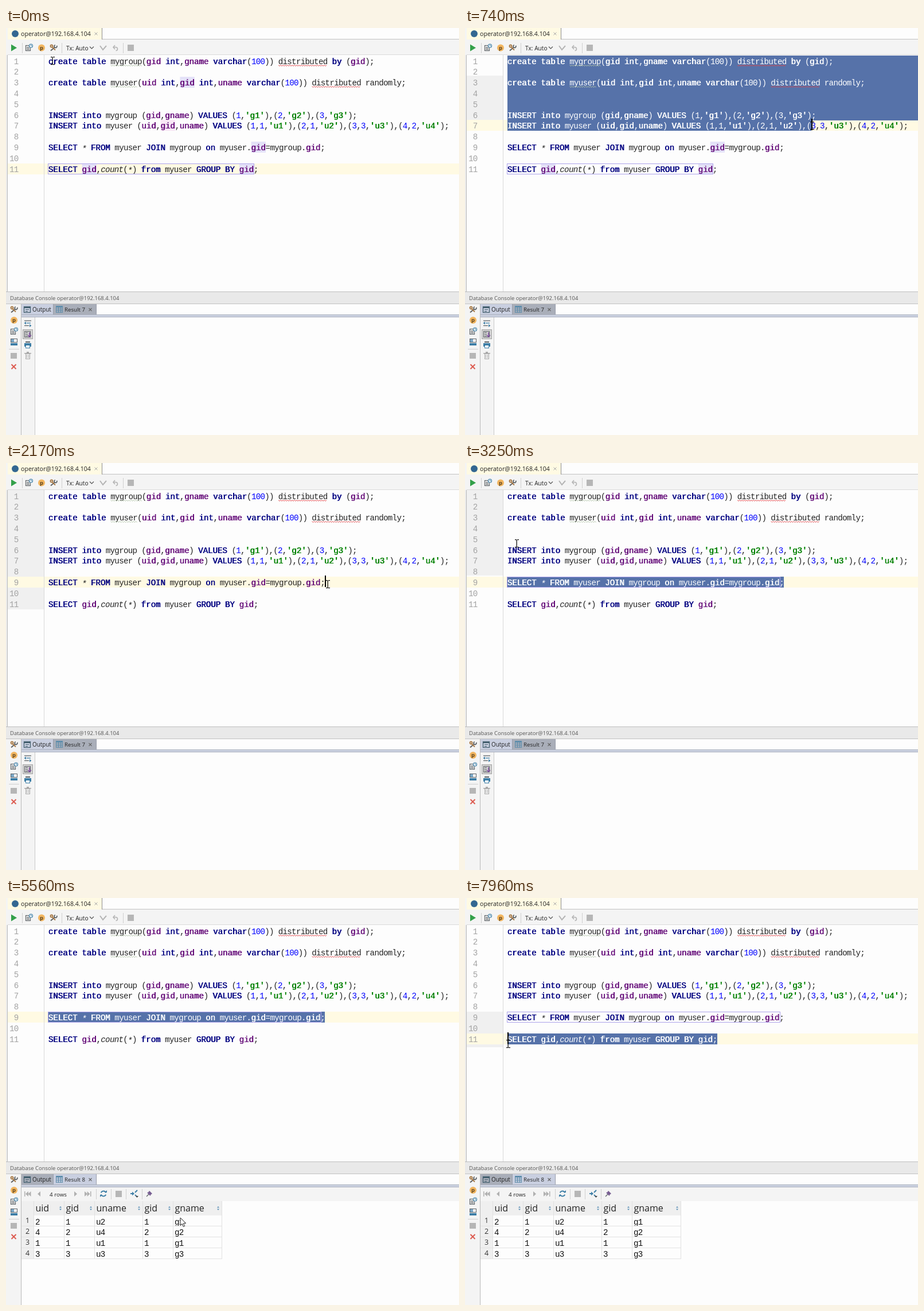
Animation, 790 px wide and 709 px high, one loop 8 s. Source, as an HTML page with a canvas:

```html
<!DOCTYPE html>
<html lang="en">
<head>
<meta charset="utf-8">
<title>SQL console</title>
<style>
html, body { margin: 0; width: 790px; height: 709px; overflow: hidden; background: #fdfdfd; }
canvas { display: block; }
</style>
</head>
<body>
<canvas id="stage" width="790" height="709"></canvas>
<script>
const ctx = document.getElementById('stage').getContext('2d');
const LOOP = 8000, LEFT = 74, TOP = 47.5, ROW = 18.83, REG = 7.8, BOLD = 8.45;
const MONO = '"Liberation Mono", monospace', UI = '"Open Sans", sans-serif';
const HOST = 'operator@192.168.4.104';
const BLUE = '#3d7ea6', DARK = '#5f6468', CREAM = '#fffae3', BAR = '#f4f4f4';

const SQL = [
  'create table mygroup(gid int,gname varchar(100)) distributed by (gid);', '',
  'create table myuser(uid int,gid int,uname varchar(100)) distributed randomly;', '', '',
  "INSERT into mygroup (gid,gname) VALUES (1,'g1'),(2,'g2'),(3,'g3');",
  "INSERT into myuser (uid,gid,uname) VALUES (1,1,'u1'),(2,1,'u2'),(3,3,'u3'),(4,2,'u4');", '',
  'SELECT * FROM myuser JOIN mygroup on myuser.gid=mygroup.gid;', '',
  'SELECT gid,count(*) from myuser GROUP BY gid;'
];
const KEYWORD = /^(create|table|int|varchar|by|insert|into|values|select|from|join|on|group)$/i;

function style(s) {
  if (KEYWORD.test(s)) return ['#000080', true];
  if (/^[ug](id|name)$/.test(s)) return ['#660e7a', true];
  if (s[0] === "'") return ['#008000', true];
  if (/^\d/.test(s)) return ['#0000ff', false];
  return ['#222', false];
}

const lines = SQL.map(src => {
  let x = LEFT;
  const stops = [x];
  const tokens = (src.match(/'\w+'|\w+|\s+|[^\w\s]/g) || []).map(s => {
    const [color, bold] = style(s), step = bold ? BOLD : REG, x0 = x;
    for (const c of s) stops.push(x += step);
    return { s, x: x0, w: x - x0, color, bold, italic: s === 'count' || s === '*' };
  });
  return { tokens, stops, end: x };
});
const rowTop = n => Math.round(TOP + ROW * (n - 1));
const snap = (n, x) => lines[n - 1].stops.reduce((a, b) => Math.abs(b - x) < Math.abs(a - x) ? b : a);

const BURSTS = [[0, 0, 1], [160, 740, 5], [860, 1100, 3], [1250, 1250, 1], [1530, 1890, 4], [2170, 2170, 1],
  [2320, 3100, 7], [3250, 3400, 2], [3690, 3950, 3], [4350, 4350, 1], [4470, 5260, 7], [5410, 5560, 2],
  [5710, 6380, 6], [6530, 7380, 7], [7650, 7960, 3]];
const TICKS = BURSTS.flatMap(([a, b, n]) =>
  Array.from({ length: n }, (_, i) => n > 1 ? a + (b - a) * i / (n - 1) : a));

const PATH = [[0, 81, 57], [160, 95, 60], [740, 605, 170], [1100, 604, 213], [1530, 604, 219], [1650, 603, 228],
  [1890, 561, 211], [2170, 561, 211], [3100, 72, 212], [3250, 90, 140], [3400, 40, 50], [3690, 14, 36],
  [3950, 10, 33], [4470, 10, 33], [5260, 290, 530], [5560, 304, 557], [5850, 325, 640], [6110, 130, 645],
  [6380, 100, 598], [6530, 200, 555], [7000, 555, 330], [7380, 443, 248], [7650, 370, 248], [7960, 75, 254]];

function mouseAt(t) {
  const i = PATH.findIndex(p => p[0] > t);
  if (i < 0) return PATH[PATH.length - 1].slice(1);
  const [a, x, y] = PATH[i - 1], [b, u, v] = PATH[i], k = (t - a) / (b - a);
  return [x + (u - x) * k, y + (v - y) * k];
}

function box(x, y, w, h, color) { ctx.fillStyle = color; ctx.fillRect(x, y, w, h); }
function frame(x, y, w, h, color, lw = 1) {
  ctx.strokeStyle = color; ctx.lineWidth = lw; ctx.strokeRect(x + .5, y + .5, w, h);
}
function text(s, x, y, size, color = '#222', align = 'left', extra = '') {
  ctx.font = `${extra} ${size}px ${UI}`;
  ctx.textAlign = align; ctx.fillStyle = color; ctx.fillText(s, x, y);
}
// Fixed-pitch text; bold is the regular glyph struck twice
function mono(s, x, y, color, bold, italic) {
  const step = bold ? BOLD : REG;
  ctx.font = `${italic ? 'italic ' : ''}14.2px ${MONO}`;
  ctx.textAlign = 'center'; ctx.fillStyle = color;
  [...String(s)].forEach((c, i) => {
    const cx = x + i * step + REG / 2, cy = c === '*' ? y + 2 : y;
    ctx.fillText(c, cx, cy);
    if (bold) ctx.fillText(c, cx + BOLD - REG, cy);
  });
}
function path(points, color, lw, closed) {
  ctx.beginPath();
  points.forEach(([x, y]) => ctx.lineTo(x, y));
  if (closed) ctx.closePath();
  if (lw) { ctx.strokeStyle = color; ctx.lineWidth = lw; ctx.stroke(); }
  else { ctx.fillStyle = color; ctx.fill(); }
}
function disc(x, y, r, color) {
  ctx.beginPath(); ctx.arc(x, y, r, 0, 7); ctx.fillStyle = color; ctx.fill();
}
function ring(x, y, r, color, lw, a = 0, b = 7) {
  ctx.beginPath(); ctx.arc(x, y, r, a, b); ctx.strokeStyle = color; ctx.lineWidth = lw; ctx.stroke();
}
function cross(x, y, r, color, lw) {
  path([[x - r, y - r], [x + r, y + r]], color, lw);
  path([[x + r, y - r], [x - r, y + r]], color, lw);
}

function pIcon(x, y) {
  disc(x, y, 6, '#f2b661');
  text('p', x, y + 3, 9.5, '#5a4320', 'center', 'bold');
}
function wrench(x, y) {
  path([[x - 5, y + 5], [x + 2, y - 1]], DARK, 2);
  ring(x + 3.5, y - 2.5, 2.4, DARK, 1.8, -.6, 4.4);
  ring(x - 3.5, y - 3, 2, '#a87945', 1.8);
  path([[x - 2, y - 1], [x + 3, y + 4]], '#a87945', 1.8);
}
function docClock(x, y) {
  frame(x - 6, y - 4, 8, 9, DARK, 1.2);
  for (let i = 0; i < 3; i++) box(x - 4, y - 1 + i * 2, 5, 1, DARK);
  disc(x + 3.5, y - 3, 3.6, '#fff');
  ring(x + 3.5, y - 3, 3, BLUE, 1.2);
  path([[x + 3.5, y - 5], [x + 3.5, y - 3], [x + 5, y - 3]], BLUE, 1);
}
function tableIcon(x, y, color) {
  frame(x - 6, y - 6, 11, 11, color);
  box(x - 6, y - 6, 12, 3, color);
  for (let i = -2; i < 5; i += 4) box(x + i, y - 6, 1, 12, color);
  for (let i = -1; i < 5; i += 3) box(x - 6, y + i, 12, 1, color);
}
function wave(x, w, y, color) {
  const pts = [];
  for (let d = 0; d <= w; d += 2) pts.push([x + d, y + (d % 4 ? 1 : -1) * .8]);
  path(pts, color, 1);
}

function topBars(hover) {
  box(0, 0, 790, 47, BAR);
  box(168, 0, 622, 20, '#fdfdfd');
  box(3, 0, 164, 20, CREAM);
  box(167, 0, 1, 20, '#8d8d8d');
  box(168, 19, 622, 1, '#c2c2c2');
  disc(16, 10, 6, '#336791');
  text(HOST, 26, 14, 10.6);
  cross(157, 10, 2.5, '#aaa', 1);
  if (hover) { box(4, 26, 20, 18, '#d5d5d5'); frame(4, 26, 19, 17, '#c3c3c3'); }
  path([[9, 28.5], [19, 34.5], [9, 40.5]], '#33a04a', 0, true);
  for (const x of [28, 97, 204]) box(x, 26, 1, 18, '#cfcfcf');
  docClock(40, 34); pIcon(62, 34.5); wrench(83, 34.5);
  text('Tx: Auto', 105, 38.5, 10.2);
  path([[146, 32.5], [149.5, 36], [153, 32.5]], '#555', 1.2);
  path([[164, 31], [169, 38], [175, 31]], '#b4b4b4', 2);
  path([[190, 30], [187, 33.5], [190, 37]], '#b4b4b4', 1.6);
  ring(191.5, 36.5, 3, '#b4b4b4', 1.6, -1.57, 1.57);
  path([[187, 33.5], [192, 33.5]], '#b4b4b4', 1.6);
  box(212, 29, 11, 11, '#b6b6b6');
  box(3, 46, 787, 1, '#dadada');
}

function code(n, color) {
  for (const k of lines[n - 1].tokens) mono(k.s, k.x, rowTop(n) + 15, color || k.color, k.bold, k.italic);
}

function selection(t, mx, my) {
  if (t >= 160 && t < 1890) {
    const n = Math.max(1, Math.min(9, Math.floor((my - TOP) / ROW) + 1));
    return { row: n, from: 1, x0: LEFT, x1: t >= 1100 ? lines[8].end : snap(n, mx) };
  }
  if (t >= 2320 && t < 7650) {
    return { row: 9, from: 9, x0: t < 3100 ? snap(9, mx) : LEFT, x1: lines[8].end, back: true };
  }
  if (t >= 7650) return { row: 11, from: 11, x0: snap(11, mx), x1: lines[10].end, back: true };
  return { row: t < 160 ? 11 : 9, from: 0, x0: 0, x1: lines[8].end };
}

function marks(t) {
  if (t >= 1100) return;
  for (const n of [3, 7, 9, 11]) {
    const gids = lines[n - 1].tokens.filter(k => k.s === 'gid');
    (n === 9 ? gids.slice(0, 1) : gids).forEach(k =>
      box(k.x, rowTop(n), k.w, 19, n === 7 ? '#f9e8f6' : '#e4e2f8'));
  }
}

function statement(t) {
  const color = '#aca2ea', semi = n => Math.round(lines[n - 1].end - REG);
  const single = n => frame(LEFT - 1, rowTop(n), semi(n) - LEFT + 1, 18, color);
  if (t < 1100) single(11);
  else if (t >= 1250 && t < 1890) {
    const y = rowTop(9), x = semi(9) + .5;
    path([[74.5, 47.5], [774.5, 47.5], [774.5, y - .5], [x, y - .5], [x, y + 18.5], [74.5, y + 18.5]], color, 1, true);
  } else if (t >= 2960) single(9);
}

function editor(t, mx, my) {
  const sel = selection(t, mx, my);
  box(0, 47, 790, 413, '#fdfdfd');
  const gutter = t < 160 ? null : t < 1100 ? [83, 160] : t < 2320 ? [47, 255] : t < 3690 ? [47, 196] : t < 7650 ? null : [198, 260];
  if (gutter) box(3, gutter[0], 63, gutter[1] - gutter[0], '#f0f0f0');
  box(3, rowTop(sel.row), 787, 19, CREAM);
  box(66, 47, 1, 413, '#d9d9d9');
  marks(t);
  for (let n = 1; n <= 11; n++) {
    mono(n, 22 - REG * String(n).length, rowTop(n) + 15, '#a3a3a3');
    code(n);
    if (sel.from && n >= sel.from && n <= sel.row) {
      const y = rowTop(n), x1 = n === sel.row ? sel.x1 : 790;
      ctx.save();
      ctx.beginPath();
      ctx.rect(Math.round(sel.x0), y, Math.round(x1) - Math.round(sel.x0), 19);
      ctx.clip();
      box(0, y, 790, 20, '#5672a9');
      code(n, '#fff');
      ctx.restore();
    }
  }
  for (const n of [1, 3]) {
    for (const k of lines[n - 1].tokens) {
      if (k.s === 'distributed') wave(k.x, k.w, rowTop(n) + 17.5, '#e0484b');
      if (/^my/.test(k.s)) wave(k.x, k.w, rowTop(n) + 17.5, '#b5c6ac');
    }
  }
  statement(t);
  const blink = t < 3250 || t >= 7650 || t % 1000 >= 600;
  if (t >= 160 && blink) box(Math.round(sel.back ? sel.x0 : sel.x1), rowTop(sel.row) - 2, 2, 20, '#000');
  box(0, 20, 2, 440, '#ececec');
  box(2, 20, 1, 440, '#b9b9b9');
}

function outputPane() {
  box(27, 504, 23, 205, BAR);
  box(50, 504, 1, 205, '#c8c8c8');
  path([[32, 510], [44, 510]], DARK, 1.3);
  path([[36, 514], [43, 514]], BLUE, 1.3); path([[35, 511.5], [31.5, 514], [35, 516.5]], BLUE, 0);
  path([[32, 518.5], [40, 518.5]], DARK, 1.3); path([[41, 516], [44.5, 518.5], [41, 521]], BLUE, 0);
  box(29, 525, 18, 17, '#d3d3d3'); frame(29, 525, 17, 16, '#a5a5a5');
  frame(32, 528, 10, 10, DARK);
  for (let i = 0; i < 3; i++) box(34, 530 + i * 3, 4, 1, DARK);
  path([[41, 530], [41, 537]], '#8050a0', 1.6);
  path([[38, 535], [41, 538], [44, 535]], '#8050a0', 1.4);
  box(32, 549, 12, 6, BLUE); box(34, 546, 8, 2, DARK);
  box(34, 552, 8, 6, '#fff'); frame(34, 552, 7, 5, BLUE);
  frame(34, 567, 7, 9, '#aaa'); box(32, 566, 12, 1.5, '#aaa'); box(36, 564, 4, 2, '#aaa');
  for (const x of [36, 39]) box(x, 569, 1, 6, '#aaa');
}

function resultPane() {
  const edges = [48, 101, 154, 238, 291, 376], gray = '#b0b0b0';
  box(27, 504, 763, 24, BAR);
  box(32, 511, 1.5, 9, gray);
  for (const x of [34, 38.5, 55]) path([[x + 5, 511], [x, 515.5], [x + 5, 520]], gray, 0);
  for (const x of [119, 137, 141.5]) path([[x, 511], [x + 5, 515.5], [x, 520]], gray, 0);
  box(147, 511, 1.5, 9, gray);
  text('4 rows', 76, 519.5, 9.8);
  for (const x of [157, 183, 209, 237]) box(x, 507, 1, 18, '#cfcfcf');
  ring(170, 515, 4.5, BLUE, 2, .4, 2.8); ring(170, 515, 4.5, BLUE, 2, 3.5, 5.9);
  path([[172, 513], [176, 513], [176, 509]], BLUE, 0);
  path([[168, 517], [164, 517], [164, 521]], BLUE, 0);
  box(191, 510, 11, 11, '#b6b6b6');
  path([[217, 515], [221, 515]], BLUE, 2); path([[220, 511.5], [224, 515], [220, 518.5]], BLUE, 0);
  path([[229, 509], [225, 513]], BLUE, 2); path([[225, 517], [228, 520]], BLUE, 2);
  path([[226, 519], [231, 519], [228.5, 522]], '#444', 0);
  path([[245, 520], [249, 516]], DARK, 1.3);
  path([[247, 513], [252, 518]], '#765d91', 2);
  path([[250, 510], [255, 515], [252, 517], [248, 513]], '#765d91', 0);

  box(27, 528, 349, 25, '#efefef');
  box(27, 553, 21, 75, '#efefef');
  ['uid', 'gid', 'uname', 'gid', 'gname'].forEach((s, i) => {
    const x = edges[i] + 3.5, a = edges[i + 1] - 6;
    text(s, x, 546, 16);
    path([[a - 2, 539.5], [a, 537], [a + 2, 539.5]], '#5b8fb5', 0);
    path([[a - 2, 541.5], [a, 544], [a + 2, 541.5]], '#5b8fb5', 0);
  });
  [[2, 1], [4, 2], [1, 1], [3, 3]].forEach(([u, g], r) => {
    const y = 568.6 + r * 18.8;
    text(r + 1, 37.5, y - 2.5, 12.5, '#333', 'center');
    [u, g, 'u' + u, g, 'g' + g].forEach((s, i) => mono(s, edges[i] + 3.3, y, '#111'));
    box(27, Math.round(552.5 + (r + 1) * 18.8), 350, 1, '#e3e3e3');
  });
  for (const x of edges) box(x, 528, 1, 100, '#e1e1e1');
}

function tab(x, w, active) {
  box(x, 481, w, 19, active ? '#c9cfe0' : '#a9aeb9');
  box(x + w - 1, 481, 1, 19, '#999fac');
}

function lowerPanel(done) {
  box(0, 460, 790, 249, '#fdfdfd');
  box(0, 460, 790, 20, '#e9e9e9');
  box(0, 459, 790, 1, '#bdbdbd');
  box(0, 480, 790, 1, '#c2c2c2');
  text('Database Console ' + HOST, 7, 474, 9.45, '#555');
  tab(27, 56, !done); tab(83, 75, done);
  box(27, 500, 763, 3, '#ccd2e1');
  box(27, 499, 763, 1, '#a9afbd');
  box(27, 503, 763, 1, '#a9afbd');
  frame(31, 485, 11, 10, '#44606f', 1.3);
  box(31, 485, 12, 3, '#44606f');
  for (const [y, w] of [[490, 6], [493, 4]]) box(34, y, w, 1, '#44606f');
  text('Output', 46, 494, 9.9);
  tableIcon(93, 490, '#5f8eac');
  text(done ? 'Result 8' : 'Result 7', 102, 494, 9.7);
  cross(147, 490.5, 2.5, '#666', 1.1);

  box(0, 481, 26, 228, BAR);
  box(26, 481, 1, 228, '#b9b9b9');
  wrench(14, 490.5); pIcon(14, 509); docClock(14, 528);
  frame(8, 541, 11, 6, DARK); box(9, 542, 5, 5, '#7ba8c8');
  box(8, 549, 12, 4, BLUE);
  box(5, 559, 18, 1, '#cfcfcf');
  box(8, 566, 11, 10, '#b6b6b6');
  cross(13.5, 590, 4, '#dc5b50', 2);
  if (done) resultPane(); else outputPane();
}

function spinner(t) {
  const turn = Math.floor((t - 4350) / 60);
  ctx.lineCap = 'round';
  for (let i = 0; i < 12; i++) {
    const a = i * Math.PI / 6, c = Math.cos(a), s = Math.sin(a), v = 165 + (i + 12 - turn % 12) % 12 * 5;
    path([[677 + c * 8.5, 612 + s * 8.5], [677 + c * 12.5, 612 + s * 12.5]], `rgb(${v},${v},${v})`, 2.4);
  }
  ctx.lineCap = 'butt';
}

function pointer(x, y) {
  const overText = x > 66 && y > 47 && y < 460;
  if (!overText) {
    const pts = [[0, 0], [0, 13.5], [3.2, 10.6], [5.4, 15.6], [7.6, 14.6], [5.4, 9.8], [9.6, 9.6]]
      .map(([a, b]) => [x + a, y + b]);
    path(pts, '#fff', 0, true);
    path(pts, '#222', 1, true);
    return;
  }
  x = Math.round(x); y = Math.round(y);
  box(x - .5, y - 6, 1.3, 13, '#111');
  for (const d of [-7, 6]) { box(x - 3, y + d, 3, 1.2, '#111'); box(x + 1, y + d, 3, 1.2, '#111'); }
}

function draw(now) {
  const time = now % LOOP, t = TICKS.filter(k => k <= time + .01).pop() || 0;
  const [mx, my] = mouseAt(t);
  editor(t, mx, my);
  topBars(t >= 3690 && t < 4600);
  lowerPanel(t >= 4350);
  if (t >= 4350 && t < 4600) spinner(t);
  pointer(mx, my);
}

let start;
function loop(now) {
  start ??= now;
  draw(now - start);
  requestAnimationFrame(loop);
}
draw(0);
requestAnimationFrame(loop);
</script>
</body>
</html>
```
